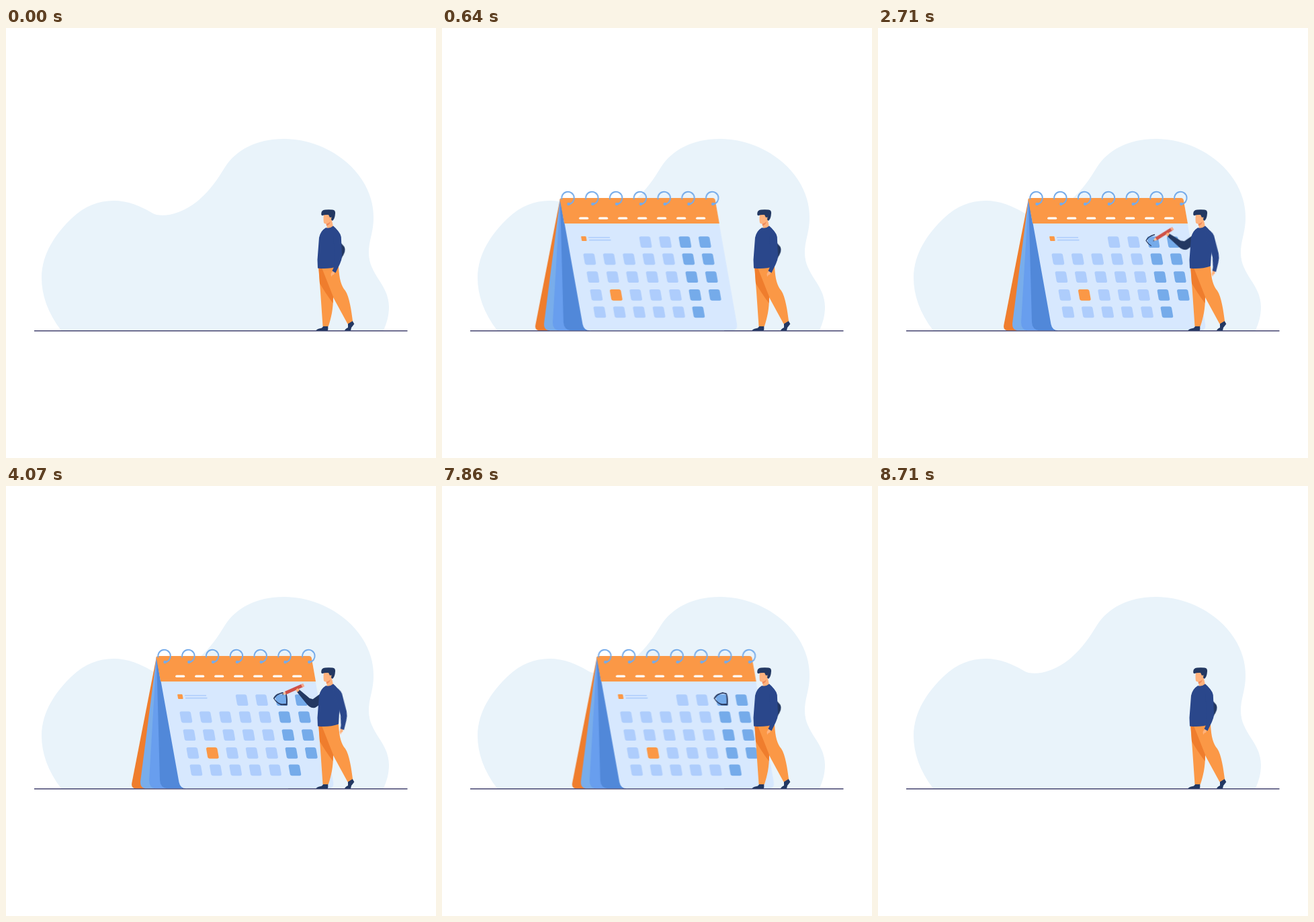
Animation of 640 by 640 pixels, one loop 9.78 s. Source, as an HTML page:

```html
<!DOCTYPE html>
<html lang="en">
<head>
<meta charset="utf-8">
<title>Calendar planning</title>
<style>
  html, body { margin: 0; width: 100%; height: 100%; overflow: hidden; background: #fff; }
  svg { display: block; width: 100vw; height: 100vh; }

  .calendar, .upper, .fore, .pencil, .near-arm, .scribble {
    animation: 9780ms linear infinite;
  }
  .calendar { animation-name: slide; }
  .upper { animation-name: upper; transform-origin: 480px 308px; }
  .fore { animation-name: fore; transform-origin: 458px 324px; }
  .pencil { animation-name: hold; }
  .near-arm { animation-name: sway; transform-origin: 490px 304px; }
  .scribble { animation-name: draw; stroke-dasharray: 100 200; }

  @keyframes slide {
    0%, .72% { transform: translateX(-445px); animation-timing-function: cubic-bezier(.165, .84, .44, 1); }
    13.5% { transform: none; }
    79.6% { transform: none; animation-timing-function: cubic-bezier(.333, 0, .667, 1); }
    89.83%, 100% { transform: translateX(400px); }
  }
  @keyframes upper {
    0%, 10.22% { transform: rotate(-95deg); animation-timing-function: ease-in; }
    14.62% { transform: rotate(-38deg); animation-timing-function: ease-out; }
    19.02%, 23.42% { transform: rotate(0deg); }
    26.5%, 36% { transform: rotate(3deg); }
    30%, 39% { transform: rotate(-3deg); }
    33%, 41.6% { transform: rotate(0deg); }
    43.87% { transform: rotate(0deg); animation-timing-function: ease-in; }
    48.5% { transform: rotate(-38deg); }
    53% { transform: rotate(-80deg); animation-timing-function: ease-out; }
    59.2%, 100% { transform: rotate(-95deg); }
  }
  @keyframes fore {
    0%, 10.22% { transform: rotate(-16deg); animation-timing-function: ease-in; }
    14.62% { transform: rotate(6deg); animation-timing-function: ease-out; }
    19.02%, 23.42% { transform: rotate(0deg); }
    25%, 34.5% { transform: rotate(-6deg); }
    28.5%, 37.5% { transform: rotate(-10deg); }
    33%, 41.6% { transform: rotate(0deg); }
    43.87% { transform: rotate(0deg); animation-timing-function: ease-in; }
    48.5% { transform: rotate(6deg); }
    53%, 100% { transform: rotate(-16deg); }
  }
  @keyframes hold {
    0%, 11.69% { visibility: hidden; }
    11.7%, 52.9% { visibility: visible; }
    53%, 100% { visibility: hidden; }
  }
  @keyframes sway {
    0%, 10.6% { transform: rotate(0deg); animation-timing-function: ease-in-out; }
    19.02% { transform: rotate(-12deg); }
    43.87% { transform: rotate(-12deg); animation-timing-function: ease-in-out; }
    59.2%, 100% { transform: rotate(0deg); }
  }
  @keyframes draw {
    0%, 23.42% { stroke-dashoffset: 101; }
    41.6%, 100% { stroke-dashoffset: 0; }
  }
</style>
</head>
<body>
<svg viewBox="0 0 640 640">
  <defs>
    <path id="blob" d="M82 450C62 424 53 397 53 372C53 335 75 305 98 283C117 265 138 257 160 257C182 257 200 265 217 275C232 284 262 277 287 256C305 240 315 225 326 207C342 182 372 165 414 165C480 165 547 215 547 282C547 305 540 315 540 335C540 367 570 382 570 415C570 430 566 440 562 450Z"/>
    <clipPath id="window">
      <use href="#blob"/>
      <rect x="160" y="235" width="260" height="215.5"/>
    </clipPath>
  </defs>

  <use href="#blob" fill="#e9f3fa"/>
  <path d="M42 450.8H597.5" stroke="#454470" stroke-width="1.6"/>

  <g clip-path="url(#window)">
    <g class="calendar">
      <path d="M224 254L187.3 442Q186 450 193 450.3H262Z" fill="#ef7d2d"/>
      <path d="M224 254L200 440Q199.500 449 207 450.300H262Z" fill="#78adeb"/>
      <path d="M224 254L213 438Q213 449 222 450.300H262Z" fill="#689eee"/>
      <path d="M224 254L229 438Q229.500 449 240 450.300H270Z" fill="#5188d9"/>
      <path d="M224 254L257.500 441Q259.500 450.300 268 450.300H480Q488.500 450 487.200 441L460.500 290H230Z" fill="#d7e8fe"/>
      <path d="M223.600 255.500Q223.600 253 226 253H451Q454 253 454.800 256L461 291H230.300Z" fill="#fb9846"/>
      <g id="rings" fill="none" stroke="#75abea" stroke-width="2"/>
      <g id="dashes" stroke="#fff" stroke-width="3.200" stroke-linecap="round"/>
      <rect width="7.500" height="7" rx="1" transform="translate(255 310) skewX(10)" fill="#fb9846"/>
      <path d="M266 311.700H298M267 315.600H299.500" stroke="#aecdfc" stroke-width="1.600"/>
      <g id="cells"/>
      <path class="scribble" pathLength="100" fill="none" stroke="#2b3b61" stroke-width="1.300" stroke-linejoin="round"
        d="M412 307.500Q402 310 399 316.500Q403 323 409 325.500L418 325.800Q419 316 417 310Q413 306.500 404 310Q400 313 398.500 316Q404 324 411 325L417.500 324.500Q418 315 416.500 309L411.500 308"/>
    </g>
  </g>

  <g class="upper">
    <path d="M480 308L458 324" stroke="#233862" stroke-width="12.500" stroke-linecap="round"/>
    <g class="fore">
      <path d="M433 306.500L436.500 303L452 316Q458 317 463 322Q463 330 456 330Q452 329.500 448 325Z" fill="#233862"/>
      <g class="pencil">
        <path d="M441 297L416 308" stroke="#cf5148" stroke-width="5"/>
        <path d="M440 297.500L443.300 296" stroke="#f5a98c" stroke-width="5"/>
        <path d="M415 305.700L417 310.300L411 310.600Z" fill="#ffc39a"/>
        <path d="M412.500 309.200L413.200 310.700L410.500 311Z" fill="#233862"/>
      </g>
      <path d="M433 307L431.500 303.500L433.500 301.300L437 302.500L436 305Z" fill="#ffb27d"/>
    </g>
  </g>

  <g>
    <path d="M461 450.500Q463 447.500 470 446.500L473 443H479.300V449Q479 450.500 477 450.500Z" fill="#233862"/>
    <path d="M504 450.500Q505 447.500 509 446V440L515.500 435.500L518.300 440.500L514 446L513 450.500Z" fill="#233862"/>
    <path d="M465 355H495C496 374 499 384 505 391C511 400 514 420 516 436L508.500 440.500L487 401C487 418 484 432 479.800 444H471.500L468 393Z" fill="#fb9846"/>
    <path d="M465.500 357H470L487 400L486.500 409.500Q475 394 467 380Z" fill="#ef7d2d"/>
    <path d="M476.500 288L478 299H486.500L487 296L484.500 284Z" fill="#ffb27d"/>
    <path d="M476.500 291.300Q481 290.500 483 288Q482 293 477 294.500Z" fill="#f18b5b"/>
    <path d="M473 277Q472 285 473 290Q475 292.500 479 290.500Q484 288 485 283L483 277Z" fill="#ffb27d"/>
    <path d="M469.300 278Q468.500 271 475 270.500Q480 269.800 486 270.500Q490.500 271 490 276Q489.500 284 486 287L484 285.500L484.500 281.500L482 282L480 278Q475 277.500 470.500 279.200Z" fill="#233862"/>
    <path d="M476 297.300Q482 299 487 294.500Q496 302 497.500 310L495 354.500Q480 359.500 464 357.500L463.500 345Q465 325 466 312Q468 302 476 297.300Z" fill="#2a478b"/>
  </g>

  <g class="near-arm">
    <path d="M486.500 360.500L483.500 366L484 370.300L486 367.500L488 367L490 362Z" fill="#ffb27d"/>
    <path d="M487 297Q497 302 498.800 311L500 338Q500 345 497 351L490.500 364.500L485.500 361.500L487.500 357L490 342L487 310Z" fill="#2a478b"/>
  </g>
</svg>
<script>
  const add = (id, tag, attrs) => {
    const el = document.createElementNS("http://www.w3.org/2000/svg", tag);
    for (const key in attrs) el.setAttribute(key, attrs[key]);
    document.getElementById(id).append(el);
  };

  for (let i = 0; i < 7; i++) {
    const x = 235.800 + i * 35.800;
    add("rings", "path", { d: `M${x - 9.300} 255.300A9.300 9.300 0 1 1 ${x + 1} 262.300` });
    add("rings", "circle", { cx: x + .8, cy: 262, r: 1.300, fill: "#75abea" });
    add("dashes", "path", { d: `M${253.800 + i * 29} 283.200h10.800` });
  }

  const rows = [310.200, 335.600, 362.200, 389, 414.500];
  rows.forEach((y, row) => {
    for (let col = row ? 0 : 3; col < (row === 4 ? 6 : 7); col++) {
      const marked = row === 3 && col === 1;
      add("cells", "rect", {
        width: 16.500, height: 16.800, rx: 2.800,
        transform: `translate(${253.200 + row * 5 + col * 29.400} ${y}) skewX(10)`,
        fill: marked ? "#fb9846" : col > 4 ? "#75abea" : "#aecdfc"
      });
    }
  });
</script>
</body>
</html>
```
